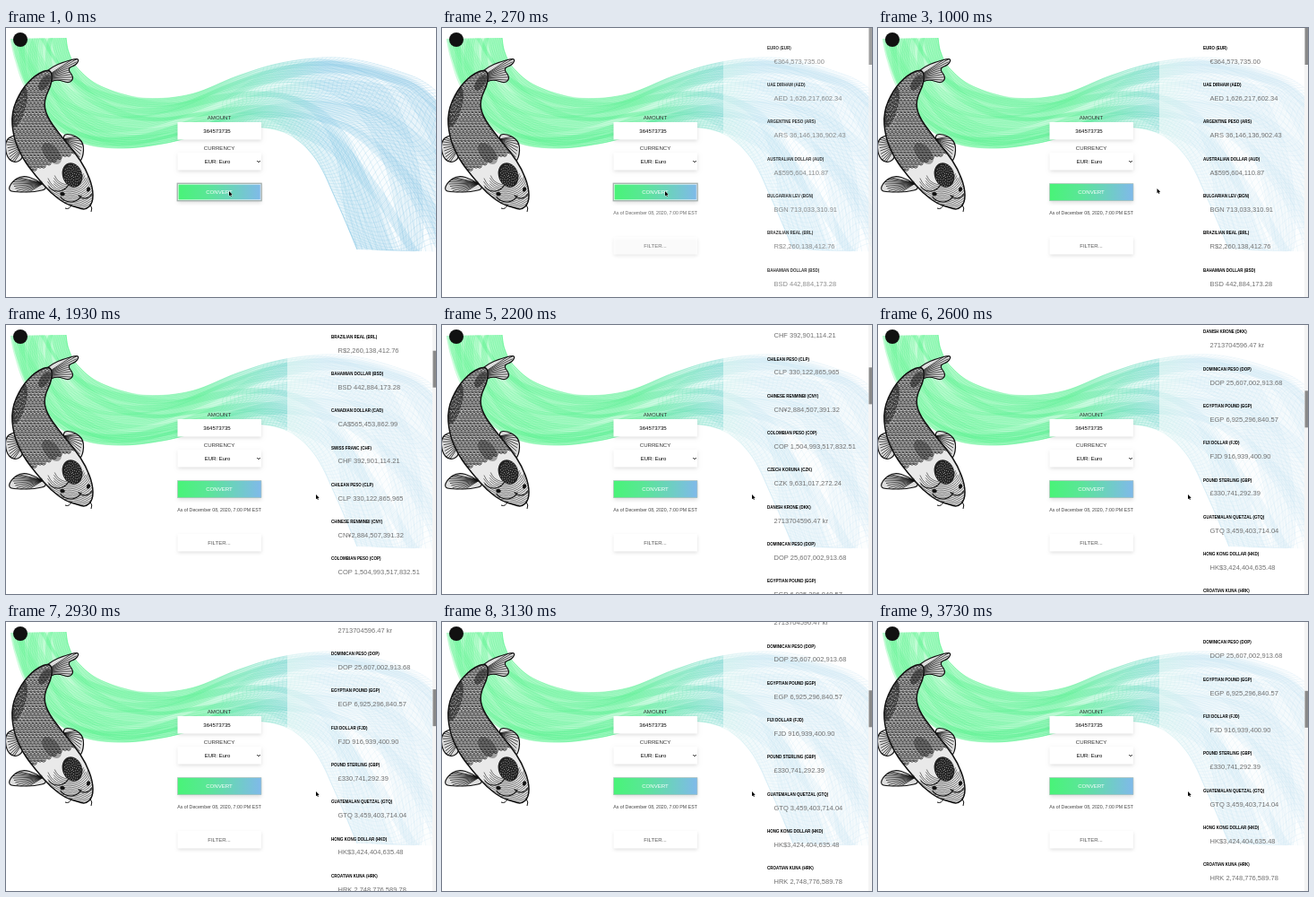
Recreate the animation shown at these times as an HTML page with a canvas. Size 480 by 300 pixels, loop 3.99 s.

```html
<!DOCTYPE html>
<html lang="en">
<head>
<meta charset="utf-8">
<title>Currency converter</title>
<style>
html, body { margin: 0; width: 100%; height: 100%; overflow: hidden; background: #fff; }
canvas { display: block; width: 480px; height: 300px; }
</style>
</head>
<body>
<canvas id="stage" width="480" height="300"></canvas>
<script>
const LOOP = 3990, FONT = '"Liberation Sans", Arial, sans-serif';
const ctx = document.getElementById('stage').getContext('2d');

const rates = [
  ['EURO (EUR)', '€364,573,735.00'],
  ['UAE DIRHAM (AED)', 'AED 1,626,217,602.34'],
  ['ARGENTINE PESO (ARS)', 'ARS 36,146,136,902.43'],
  ['AUSTRALIAN DOLLAR (AUD)', 'A$595,604,110.87'],
  ['BULGARIAN LEV (BGN)', 'BGN 713,033,310.91'],
  ['BRAZILIAN REAL (BRL)', 'R$2,260,138,412.76'],
  ['BAHAMIAN DOLLAR (BSD)', 'BSD 442,884,173.28'],
  ['CANADIAN DOLLAR (CAD)', 'CA$565,453,862.99'],
  ['SWISS FRANC (CHF)', 'CHF 392,901,114.21'],
  ['CHILEAN PESO (CLP)', 'CLP 330,122,865,965'],
  ['CHINESE RENMINBI (CNY)', 'CN¥2,884,507,391.32'],
  ['COLOMBIAN PESO (COP)', 'COP 1,504,993,517,832.51'],
  ['CZECH KORUNA (CZK)', 'CZK 9,631,017,272.24'],
  ['DANISH KRONE (DKK)', '2713704596.47 kr'],
  ['DOMINICAN PESO (DOP)', 'DOP 25,607,002,913.68'],
  ['EGYPTIAN POUND (EGP)', 'EGP 6,925,296,840.57'],
  ['FIJI DOLLAR (FJD)', 'FJD 916,939,400.90'],
  ['POUND STERLING (GBP)', '£330,741,292.39'],
  ['GUATEMALAN QUETZAL (GTQ)', 'GTQ 3,459,403,714.04'],
  ['HONG KONG DOLLAR (HKD)', 'HK$3,424,404,635.48'],
  ['CROATIAN KUNA (HRK)', 'HRK 2,748,776,589.78']
];

const pairs = s => s.split(' ').map(p => p.split(',').map(Number));
const ribbonTop = pairs('67,11 70,27 80,45 106,65 153,78 206,74 260,53 312,38 372,33 432,46 482,72 540,150 570,252');
const ribbonLow = pairs('5,12 10,35 22,68 48,105 85,128 130,134 180,128 232,115 275,110 314,118 345,145 369,193 392,247');

function spline(pts, s) {
  const i = Math.min(pts.length - 2, Math.floor(s)), t = s - i;
  const at = n => pts[Math.max(0, Math.min(pts.length - 1, n))];
  const [a, b, c, d] = [at(i - 1), at(i), at(i + 1), at(i + 2)];
  return [0, 1].map(k => b[k] + t / 2 * (c[k] - a[k] +
    t * (2 * a[k] - 5 * b[k] + 4 * c[k] - d[k] + t * (3 * (b[k] - c[k]) + d[k] - a[k]))));
}

function ribbon(s, f) {
  const a = spline(ribbonTop, s), b = spline(ribbonLow, s);
  return [a[0] + (b[0] - a[0]) * f, a[1] + (b[1] - a[1]) * f];
}

function curve(g, point, from, to, step) {
  g.beginPath();
  for (let s = from; s <= to + 1e-6; s += step) g.lineTo(...point(s));
  g.stroke();
}

function tint(g, stops) {
  const paint = g.createLinearGradient(0, 0, 480, 0);
  stops.forEach(([at, color]) => paint.addColorStop(at, color));
  return paint;
}

function veil(g, upper, lower) {
  g.beginPath();
  for (let s = 0; s <= 12; s += .1) g.lineTo(...ribbon(s, upper(s)));
  for (let s = 12; s >= 0; s -= .1) g.lineTo(...ribbon(s, lower(s)));
  g.fill();
}

function drawRibbon(g) {
  g.fillStyle = tint(g, [[0, 'rgba(90,248,140,.2)'], [.2, 'rgba(85,246,140,.4)'],
    [.46, 'rgba(85,243,150,.32)'], [.62, 'rgba(115,225,205,.18)'], [.8, 'rgba(130,200,230,.06)'], [1, 'rgba(130,200,230,.04)']]);
  veil(g, () => 0, () => 1);

  const ink = tint(g, [[0, '#55f389'], [.45, '#4eed8b'], [.6, '#6cdcbf'], [.74, '#7cc4e2'], [1, '#7abce0']]);
  g.fillStyle = g.strokeStyle = ink;
  g.lineWidth = .5;
  // Folded sheets that drift across the width of the ribbon.
  for (let n = 0; n < 9; n++) {
    const centre = s => .5 + .42 * Math.sin(n * 2.4 + s * .28);
    const half = s => .03 + .07 * (1 + Math.sin(s * .5 + n));
    const edge = side => s => Math.max(0, Math.min(1, centre(s) + side * half(s)));
    g.globalAlpha = .13;
    veil(g, edge(-1), edge(1));
    g.globalAlpha = .4;
    for (let side = -1; side <= 1.01; side += .25)
      curve(g, s => ribbon(s, edge(side)(s)), 0, 12, .12);
  }
  g.globalAlpha = .4;
  for (let n = 0; n <= 30; n++) {
    const f = n / 30;
    curve(g, s => ribbon(s, f + .03 * Math.sin(s * 1.2 + f * 8) * Math.sin(f * Math.PI)), 0, 12, .12);
  }
  g.globalAlpha = .42;
  for (let s = 6.5; s <= 12; s += .075)
    curve(g, f => ribbon(Math.min(12, s + .16 * Math.sin(f * 11 + s)), f), 0, 1, .04);
  g.globalAlpha = 1;
}

function blob(g, text) {
  const p = pairs(text), mid = i => {
    const a = p[i % p.length], b = p[(i + 1) % p.length];
    return [(a[0] + b[0]) / 2, (a[1] + b[1]) / 2];
  };
  g.beginPath();
  g.moveTo(...mid(0));
  for (let i = 1; i <= p.length; i++) g.quadraticCurveTo(...p[i % p.length], ...mid(i));
  g.closePath();
}

function fin(g, shape, root, tips) {
  blob(g, shape);
  g.fillStyle = '#ddd';
  g.fill();
  g.lineWidth = 1.2;
  g.stroke();
  g.save();
  g.clip();
  g.lineWidth = .75;
  const [a, b] = pairs(tips);
  for (let n = 0; n <= 10; n++) {
    g.beginPath();
    g.moveTo(...root);
    g.lineTo(a[0] + (b[0] - a[0]) * n / 10, a[1] + (b[1] - a[1]) * n / 10);
    g.stroke();
  }
  g.restore();
}

function ellipse(g, x, y, rx, ry, turn, color) {
  g.beginPath();
  g.ellipse(x, y, rx, ry, turn, 0, 7);
  g.fillStyle = color;
  g.fill();
}

function drawScales(g) {
  g.lineWidth = .8;
  g.fillStyle = '#222';
  for (let row = 0; row < 38; row++)
    for (let col = 0; col < 22; col++) {
      const x = col * 4 + row % 2 * 2, y = 42 + row * 3.2;
      if (y > 146 + (60 - x) * .45) continue;
      g.beginPath();
      g.arc(x, y, 2.1, -.2, 3.3);
      g.stroke();
      g.fillRect(x - .6, y - .5, 1.3, 1.5);
    }
}

function drawHead(g) {
  g.lineWidth = .55;
  for (let n = 0; n < 16; n++) {
    g.beginPath();
    g.arc(70, 158, 17 + n * 2, .25 + n % 3 * .1, 2.75 - n % 4 * .12);
    g.stroke();
  }
  ellipse(g, 74, 164, 11, 14, -.35, '#222');
  g.lineWidth = 1.1;
  for (const [x, y, r] of [[58, 169, 13], [72, 180, 14], [88, 181, 9]]) {
    g.beginPath();
    g.arc(x, y, r, .5, 2.5);
    g.stroke();
  }
  ellipse(g, 63, 185, 2.7, 2.2, .3, '#111');
  ellipse(g, 92, 180, 2, 2.7, .3, '#111');
}

function drawKoi(g) {
  g.strokeStyle = '#111';
  g.lineJoin = 'round';
  fin(g, '38,54 52,43 64,38 82,33 79,41 68,45 76,55 71,62 57,57 46,62', [42, 56], '80,31 73,65');
  fin(g, '20,122 8,119 -1,126 0,142 8,151 20,146', [22, 130], '-1,120 6,154');
  fin(g, '34,169 18,164 6,172 2,182 16,183 32,183 48,179', [42, 173], '2,164 16,189');
  fin(g, '62,118 76,119 87,128 86,145 79,153 69,140', [64, 124], '88,119 80,155');
  const body = '50,45 33,52 17,69 6,94 8,121 18,145 34,166 50,184 66,196 79,200 89,203 97,195 97,178 89,157 77,139 60,119 45,98 42,81 52,60';
  blob(g, body);
  g.fillStyle = '#e9e9e9';
  g.fill();
  g.save();
  g.clip();
  drawScales(g);
  ellipse(g, 15, 88, 7, 23, .25, 'rgba(20,20,20,.55)');
  ellipse(g, 43, 61, 5, 10, .6, 'rgba(20,20,20,.5)');
  ellipse(g, 51, 140, 8, 14, -.7, 'rgba(20,20,20,.35)');
  drawHead(g);
  g.fillStyle = '#ccc';
  for (let n = 0; n < 70; n++) {
    const r = Math.sqrt(n / 70), a = n * 2.4;
    g.fillRect(74 + 10 * r * Math.cos(a), 164 + 13 * r * Math.sin(a), .8, .8);
    g.fillRect(15 + 7 * r * Math.cos(a), 88 + 22 * r * Math.sin(a), .9, .9);
  }
  g.restore();
  blob(g, body);
  g.lineWidth = 1.5;
  g.stroke();
  g.lineWidth = 1;
  g.beginPath();
  g.moveTo(73, 197); g.quadraticCurveTo(71, 203, 66, 201);
  g.moveTo(94, 197); g.quadraticCurveTo(97, 201, 95, 205);
  g.stroke();
}

function text(g, str, x, y, size, color, align = 'center', weight = '') {
  g.font = `${weight} ${size}px ${FONT}`;
  g.textAlign = align;
  g.textBaseline = 'alphabetic';
  g.fillStyle = color;
  g.fillText(str, x, y + size * .36);
}

function field(g, y, paint = '#fff') {
  g.save();
  g.shadowColor = 'rgba(0,0,0,.13)';
  g.shadowBlur = 4;
  g.shadowOffsetY = 1.5;
  g.fillStyle = paint;
  g.fillRect(191.5, y, 93.5, 19.5);
  g.restore();
}

function drawForm(g) {
  text(g, 'AMOUNT', 238, 100, 6.1, '#333');
  field(g, 105);
  text(g, '364573735', 235.5, 114.7, 6.1, '#000');
  text(g, 'CURRENCY', 238, 134, 6.1, '#333');
  field(g, 139);
  text(g, 'EUR: Euro', 236, 149, 6, '#000');
  g.strokeStyle = '#111';
  g.lineWidth = 1;
  g.beginPath();
  g.moveTo(280.3, 148); g.lineTo(282, 149.8); g.lineTo(283.7, 148);
  g.stroke();
  const paint = g.createLinearGradient(191, 0, 285, 0);
  paint.addColorStop(0, '#48f477');
  paint.addColorStop(.35, '#59e795');
  paint.addColorStop(1, '#80b9ea');
  field(g, 173.5, paint);
  g.strokeStyle = '#b0c4bd';
  g.lineWidth = .7;
  g.strokeRect(191.5, 173.5, 93.5, 19);
  text(g, 'CONVERT', 238, 183, 6.1, '#fff');
}

const art = document.createElement('canvas');
art.width = 480;
art.height = 300;
{
  const g = art.getContext('2d');
  g.fillStyle = '#fff';
  g.fillRect(0, 0, 480, 300);
  drawRibbon(g);
  drawKoi(g);
  ellipse(g, 16, 13, 8, 8, 0, '#111');
  drawForm(g);
}

function glide(t, t0, t1, from, to, power) {
  const u = Math.max(0, Math.min(1, (t - t0) / (t1 - t0)));
  return to + (from - to) * (1 - u) ** power;
}

function scrollAt(t) {
  if (t < 1930) return 0;
  if (t < 2470) return glide(t, 1930, 2400, 215.7, 373, 2.6);
  if (t < 2930) return glide(t, 2400, 2730, 373, 563, 3);
  return glide(t, 2930, 3400, 565, 577.6, 2);
}

function drawResults(scroll, alpha) {
  ctx.globalAlpha = alpha;
  text(ctx, 'As of December 08, 2020, 7:00 PM EST', 238, 206.5, 5.25, '#444');
  field(ctx, 233);
  text(ctx, 'FILTER...', 238, 242.5, 6.1, '#555');
  ctx.fillStyle = 'rgba(255,255,255,.55)';
  ctx.fillRect(314, 0, 162, 300);
  rates.forEach(([name, value], i) => {
    const y = 22.2 + i * 41.3 - scroll;
    if (y < -25 || y > 310) return;
    text(ctx, name, 363, y, 4.5, '#000', 'left', 'bold');
    text(ctx, value, 370.5, y + 14.8, 7.5, '#707070', 'left');
  });
  ctx.fillStyle = '#f4f4f4';
  ctx.fillRect(476, 0, 4, 300);
  ctx.fillStyle = '#8a8a8a';
  ctx.fillRect(476.5, scroll * .133, 3.5, 41);
  ctx.globalAlpha = 1;
}

function drawFocusRing() {
  ctx.strokeStyle = '#fff';
  ctx.lineWidth = .7;
  ctx.strokeRect(192.2, 174.2, 92, 17.6);
  ctx.strokeStyle = '#a4adab';
  ctx.lineWidth = 1.1;
  ctx.strokeRect(191.2, 173.2, 94, 19.6);
}

function drawCursor(x, y) {
  ctx.beginPath();
  pairs('0,0 0,5.2 1.2,4.2 2,6 2.9,5.6 2.1,3.9 3.7,3.8').forEach(p => ctx.lineTo(x + p[0], y + p[1]));
  ctx.closePath();
  ctx.strokeStyle = '#fff';
  ctx.lineWidth = .8;
  ctx.stroke();
  ctx.fillStyle = '#000';
  ctx.fill();
}

// The picture advances at 15 steps per second, on whole 10 ms marks.
const mark = k => Math.round(k * 20 / 3) * 10;

function render(time) {
  let step = Math.round(time * .015);
  if (mark(step) > time) step--;
  const t = mark(step);
  ctx.drawImage(art, 0, 0);
  if (t < 1000) drawFocusRing();
  if (step > 0) drawResults(scrollAt(t), Math.min(1, step / 5));
  if (t < 1000) drawCursor(249, 182);
  else if (t < 1930) drawCursor(311.5, 179);
  else drawCursor(346, 189);
}

const start = performance.now();
function tick() {
  render((performance.now() - start) % LOOP);
  requestAnimationFrame(tick);
}
tick();
</script>
</body>
</html>
```
